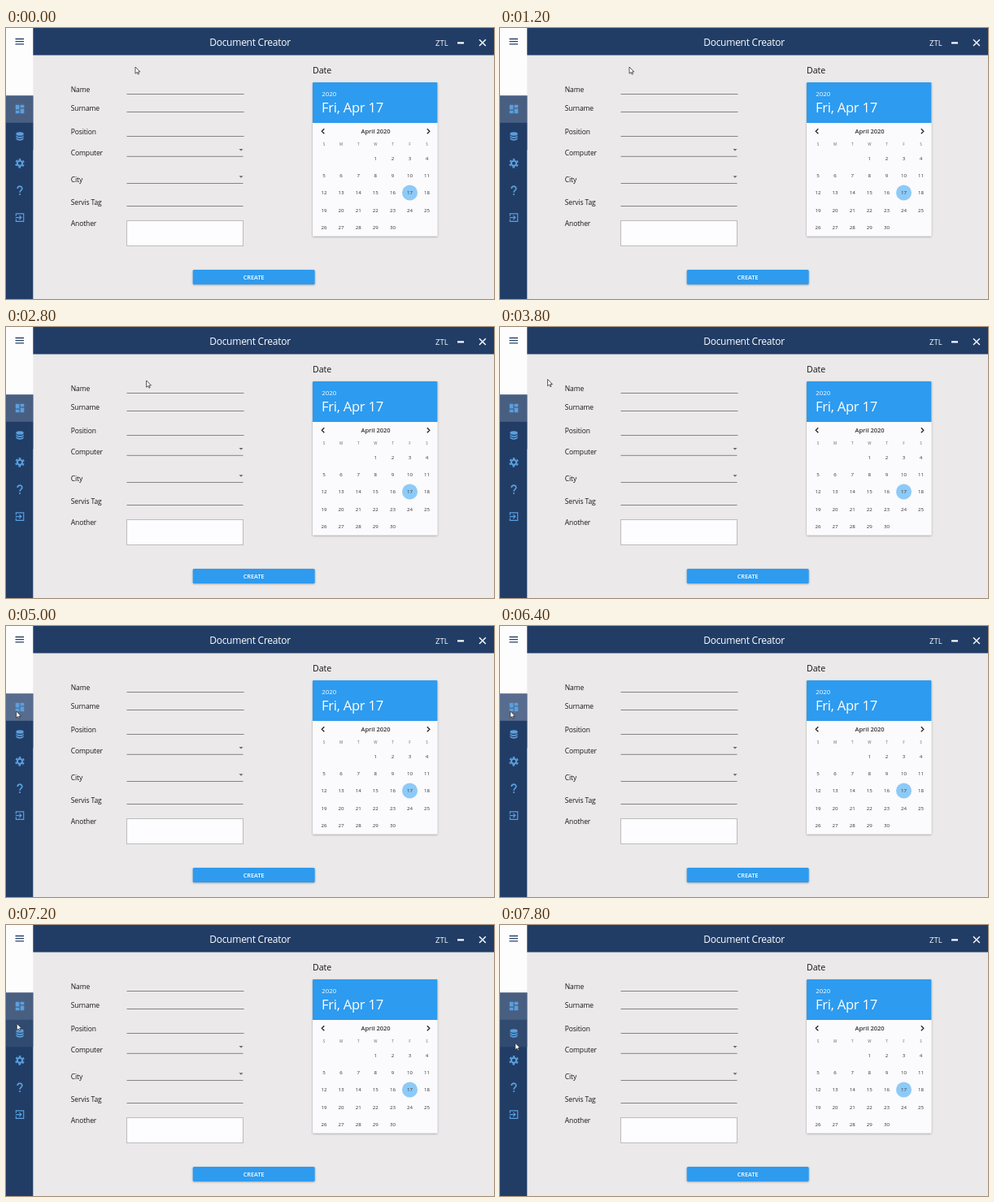
Write an HTML page that moves like this. It is 600x334 px and loops after 8 s.

```html
<!DOCTYPE html>
<html lang="en">
<head>
<meta charset="utf-8">
<title>Document Creator</title>
<style>
  html, body { margin: 0; width: 100%; height: 100%; overflow: hidden; background: #ebe9ea; }
  svg { display: block; width: 100vw; height: 100vh; }
  text { font-family: "Open Sans", "Noto Sans", sans-serif; fill: #181818; }
  .mid { text-anchor: middle; }
  .label { font-size: 8.5px; letter-spacing: -.12px; }
  .light { fill: #fff; }
  .semi { font-weight: 600; }
  .day { font-size: 6.1px; fill: #333; }
  .week { font-size: 4.5px; font-weight: 600; fill: #888; }
  .line { stroke: #858585; stroke-width: 1; }
  .icon { fill: #5b9fdd; stroke: none; }
  .icon .ring { fill: none; stroke: #5b9fdd; }
</style>
</head>
<body>
<svg viewBox="0 0 600 334" preserveAspectRatio="none">
  <defs>
    <filter id="shadow" x="-10%" y="-30%" width="120%" height="180%">
      <feDropShadow dx="0" dy=".8" stdDeviation=".8" flood-color="#000" flood-opacity=".35"/>
    </filter>
  </defs>
  <rect width="600" height="334" fill="#ebe9ea"/>
  <rect x="33" width="567" height="33.5" fill="#213d66"/>
  <rect y="83" width="33.3" height="251" fill="#213d66"/>
  <rect width="33.3" height="83.5" fill="#fdfdfe"/>
  <path d="M11.5 13.5h10.5M11.5 16.7h10.5M11.5 19.9h10.5" stroke="#2b4268" stroke-width="1.3"/>

  <text class="light mid" x="300" y="21.7" font-size="12" letter-spacing="-.25">Document Creator</text>
  <text class="light" x="528" y="21.8" font-size="9.5">ZTL</text>
  <path d="M555 18.4h8" stroke="#fff" stroke-width="2.2"/>
  <path d="M582 14.3l7.8 7.8M589.8 14.3l-7.8 7.8" stroke="#fff" stroke-width="1.4"/>

  <g id="rows"></g>
  <g id="icons">
    <path d="M13 3V9H21V3ZM13 21H21V11H13ZM3 21H11V15H3ZM3 13H11V3H3Z"/>
    <g>
      <ellipse cx="12" cy="7" rx="8" ry="4"/>
      <path id="disc" d="M4 9c0 5.4 16 5.4 16 0v3c0 5.4-16 5.4-16 0Z"/>
      <use href="#disc" y="5"/>
    </g>
    <g class="ring">
      <circle cx="12" cy="12" r="5.3" stroke-width="3.6"/>
      <circle cx="12" cy="12" r="8.4" stroke-width="3.2" pathLength="12" stroke-dasharray="1 1" transform="rotate(-105 12 12)"/>
    </g>
    <g>
      <path class="ring" d="M7.2 8.2C7.2 1.6 16.8 1.6 16.8 8.2C16.8 11.5 12 11.6 12 16.4" stroke-width="2.9"/>
      <rect x="10.5" y="18.7" width="3" height="3"/>
    </g>
    <g class="ring" stroke-width="2">
      <path d="M4 9V4H20V20H4V15M3 12H14.5M10.8 7.7L15.1 12L10.8 16.3"/>
    </g>
  </g>

  <g id="form"></g>
  <rect x="148.5" y="237.5" width="143" height="31" fill="#fdfcfe" stroke="#bdbdbd"/>
  <g filter="url(#shadow)">
    <rect x="229.7" y="298" width="150" height="18" rx="1.5" fill="#2d9bef"/>
  </g>
  <text class="light semi mid" x="304.7" y="309.9" font-size="7.3">CREATE</text>

  <text x="377" y="56.2" font-size="10.6">Date</text>
  <g filter="url(#shadow)">
    <rect x="377" y="67" width="153.5" height="189.5" rx="1" fill="#fbfafc"/>
  </g>
  <path d="M377 117V68q0-1 1-1h151.500q1 0 1 1V117Z" fill="#2d9bef"/>
  <text class="light" x="388.3" y="84" font-size="7.9">2020</text>
  <text class="light" x="388" y="104.2" font-size="16.6" letter-spacing="-.25">Fri, Apr 17</text>
  <text class="semi mid" x="454.5" y="129.9" font-size="7.5" style="fill:#333">April 2020</text>
  <path d="M391.300 124.200l-3 3 3 3M517.800 124.200l3 3-3 3" fill="none" stroke="#222" stroke-width="1.3"/>
  <circle cx="496.500" cy="203" r="9.500" fill="#8dcaf7"/>
  <g id="calendar"></g>

  <path id="cursor" d="M0 0V8.200L2 6.500L3.300 9.200L4.500 8.600L3.300 6H5.900Z" fill="#fff" stroke="#26262b" stroke-width=".75" stroke-linejoin="round"/>
</svg>
<script>
const NS = "http://www.w3.org/2000/svg";
const $ = id => document.getElementById(id);
const LOOP = 8000, STEP = 200, ROW_TOP = 83.5, ROW_H = 33.4;

function add(parent, tag, attrs, text = "") {
  const el = document.createElementNS(NS, tag);
  for (const key in attrs) el.setAttribute(key, attrs[key]);
  el.textContent = text;
  return parent.appendChild(el);
}

// label, text baseline, underline, underline end, has dropdown
const fields = [
  ["Name", 79.3, 81.5, 292.5], ["Surname", 101.7, 103.5, 292.5],
  ["Position", 131.2, 133.5, 292.5], ["Computer", 156.8, 158.3, 291.5, true],
  ["City", 190, 191.5, 291.5, true], ["Servis Tag", 217.7, 219.5, 291.5],
  ["Another", 244.2]
];
for (const [name, base, y, end, drop] of fields) {
  add($("form"), "text", { class: "label", x: 79.8, y: base }, name);
  if (y) add($("form"), "path", { class: "line", d: `M148.500 ${y}H${end}` });
  if (drop) add($("form"), "path", { d: `M286.500 ${y - 9.300}h5l-2.500 2.500Z`, fill: "#666" });
}

const colX = c => 391 + c * 21.1;
[..."SMTWTFS"].forEach((s, c) =>
  add($("calendar"), "text", { class: "week mid", x: colX(c), y: 144.8 }, s));
for (let day = 1; day <= 30; day++) {
  const cell = day + 2;
  add($("calendar"), "text", {
    class: "day mid", x: colX(cell % 7), y: 163.2 + Math.floor(cell / 7) * 21.1
  }, day);
}

const rows = [0, 1].map(i => add($("rows"), "rect", {
  y: ROW_TOP + i * ROW_H, width: 33.3, height: ROW_H
}));
[...$("icons").children].forEach((icon, i) => {
  const holder = add($("icons"), "g", {
    class: "icon", transform: `translate(10 ${93 + i * 33.4}) scale(.585)`
  });
  holder.appendChild(icon);
});

// time, x, y of the pointer tip
const path = [
  [0, 159, 48], [2400, 159, 48], [2800, 172.6, 66], [3000, 160, 69],
  [3800, 58.6, 64.5], [4800, 16, 102], [5000, 12.6, 105], [6800, 12.6, 105],
  [7000, 12.6, 109], [7400, 14, 134], [7800, 18.8, 145.5], [LOOP, 18.8, 145.5]
];

function pointer(t) {
  const i = path.findIndex(p => p[0] > t);
  const [t0, x0, y0] = path[i - 1], [t1, x1, y1] = path[i];
  const k = (t - t0) / (t1 - t0);
  return [x0 + (x1 - x0) * k, y0 + (y1 - y0) * k];
}

function draw(time) {
  const t = Math.floor(time % LOOP / STEP) * STEP;
  const [x, y] = pointer(t);
  const hover = x < 33 ? Math.floor((y - ROW_TOP) / ROW_H) : -1;
  $("cursor").setAttribute("transform", `translate(${x} ${y})`);
  rows[0].setAttribute("fill", hover === 0 ? "#576c8e" : "#495f82");
  rows[1].setAttribute("fill", hover === 1 ? "#304a70" : "#213d66");
}

const start = performance.now();
function tick() {
  draw(performance.now() - start);
  requestAnimationFrame(tick);
}
tick();
</script>
</body>
</html>
```
